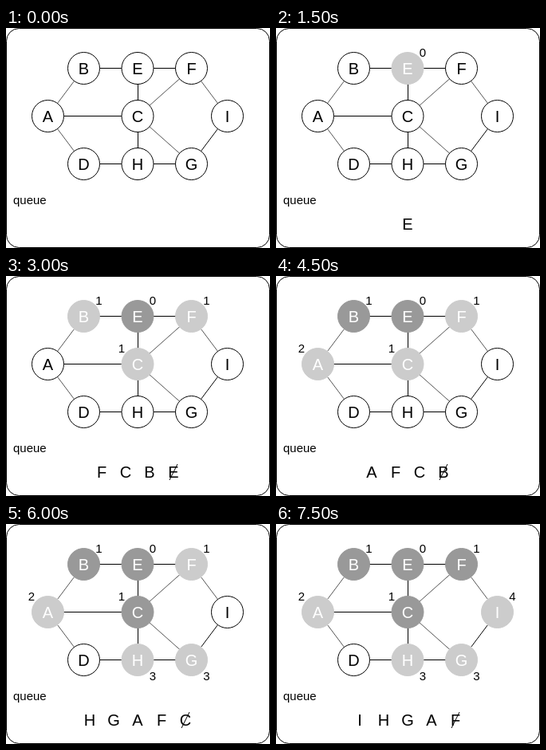
Write an HTML page that moves like this. It is 331x276 px and loops after 8 s.

```html
<!DOCTYPE html>
<html lang="en">
<head>
<meta charset="utf-8">
<title>Breadth-first search</title>
<style>
  html, body { margin: 0; width: 100%; height: 100%; overflow: hidden; background: #fff; }
  svg { display: block; width: 331px; height: 276px; font-family: "Liberation Sans", Arial, sans-serif; }
  text { text-anchor: middle; }
  .letter { font-size: 20px; }
  .small { font-size: 15px; }
</style>
</head>
<body>
<svg viewBox="0 0 331 276">
  <rect x=".5" y=".5" width="330" height="275" rx="16" fill="#fff" stroke="#000"/>
  <g id="edges"></g>
  <g id="nodes"></g>
  <text class="small" x="9" y="221" style="text-anchor: start">queue</text>
  <g id="queue"></g>
</svg>
<script>
const LOOP = 8000, STEP = 1500;
const LIGHT = '#cccccc', DARK = '#999999', SOFT = '#555';

// found / done: step at which a node joins and leaves the queue
const nodes = {
  A: { x: 52.5, y: 110.5, found: 3, level: 2, dx: -20.5, dy: -14.5 },
  B: { x: 97.5, y: 50.5, found: 2, done: 3, level: 1 },
  C: { x: 165, y: 110.5, found: 2, done: 4, level: 1, dx: -20 },
  D: { x: 97.5, y: 170.5 },
  E: { x: 165, y: 50.5, found: 1, done: 2, level: 0 },
  F: { x: 232.5, y: 50.5, found: 2, done: 5, level: 1 },
  G: { x: 232.5, y: 170.5, found: 4, level: 3, dy: 25.5 },
  H: { x: 165, y: 170.5, found: 4, level: 3, dy: 25.5 },
  I: { x: 277.5, y: 110.5, found: 5, level: 4 }
};
const edges = ['AB', 'AC', 'AD', 'BE', 'EF', 'EC', 'CF', 'CG', 'CH', 'DH', 'HG', 'FI', 'GI'];
const queues = ['', 'E', 'FCBE', 'AFCB', 'HGAFC', 'IHGAF'];

const layer = id => document.getElementById(id);

function add(parent, tag, attrs, text = '') {
  const el = document.createElementNS('http://www.w3.org/2000/svg', tag);
  for (const key in attrs) el.setAttribute(key, attrs[key]);
  el.textContent = text;
  return parent.appendChild(el);
}

function drawEdge([from, to]) {
  const a = nodes[from], b = nodes[to];
  const vertical = a.x === b.x;
  const diagonal = !vertical && a.y !== b.y;
  const shift = vertical ? 0.5 : 0;
  add(layer('edges'), 'line', {
    x1: a.x + shift, y1: a.y, x2: b.x + shift, y2: b.y,
    stroke: diagonal && from + to !== 'GI' ? SOFT : '#000'
  });
}

function drawNode(name, step) {
  const { x, y, found = Infinity, done = Infinity, level, dx = 19, dy = -14.5 } = nodes[name];
  const seen = step >= found;
  const shade = step >= done ? DARK : LIGHT;
  const group = layer('nodes');
  add(group, 'circle', { cx: x, cy: y, r: 20, fill: seen ? shade : '#fff', stroke: seen ? shade : '#000' });
  add(group, 'text', { class: 'letter', x, y: y + 7.5, fill: seen ? '#fff' : '#000' }, name);
  if (seen) add(group, 'text', { class: 'small', x: x + dx, y: y + dy }, level);
}

function drawQueue(step) {
  const items = queues[step], group = layer('queue');
  const left = 165 - (items.length - 1) * 15;
  [...items].forEach((name, i) => add(group, 'text', { class: 'letter', x: left + i * 30, y: 253 }, name));
  if (step > 1) {
    const x = left + (items.length - 1) * 30;
    add(group, 'line', { x1: x - 5, y1: 256, x2: x + 5, y2: 236, stroke: '#000' });
  }
}

let shown = -1;
function render(now) {
  const step = Math.floor((now % LOOP) / STEP);
  if (step !== shown) {
    shown = step;
    layer('nodes').replaceChildren();
    layer('queue').replaceChildren();
    Object.keys(nodes).forEach(name => drawNode(name, step));
    drawQueue(step);
  }
}

edges.forEach(drawEdge);
const start = performance.now();
function tick() {
  render(performance.now() - start);
  requestAnimationFrame(tick);
}
tick();
</script>
</body>
</html>
```
